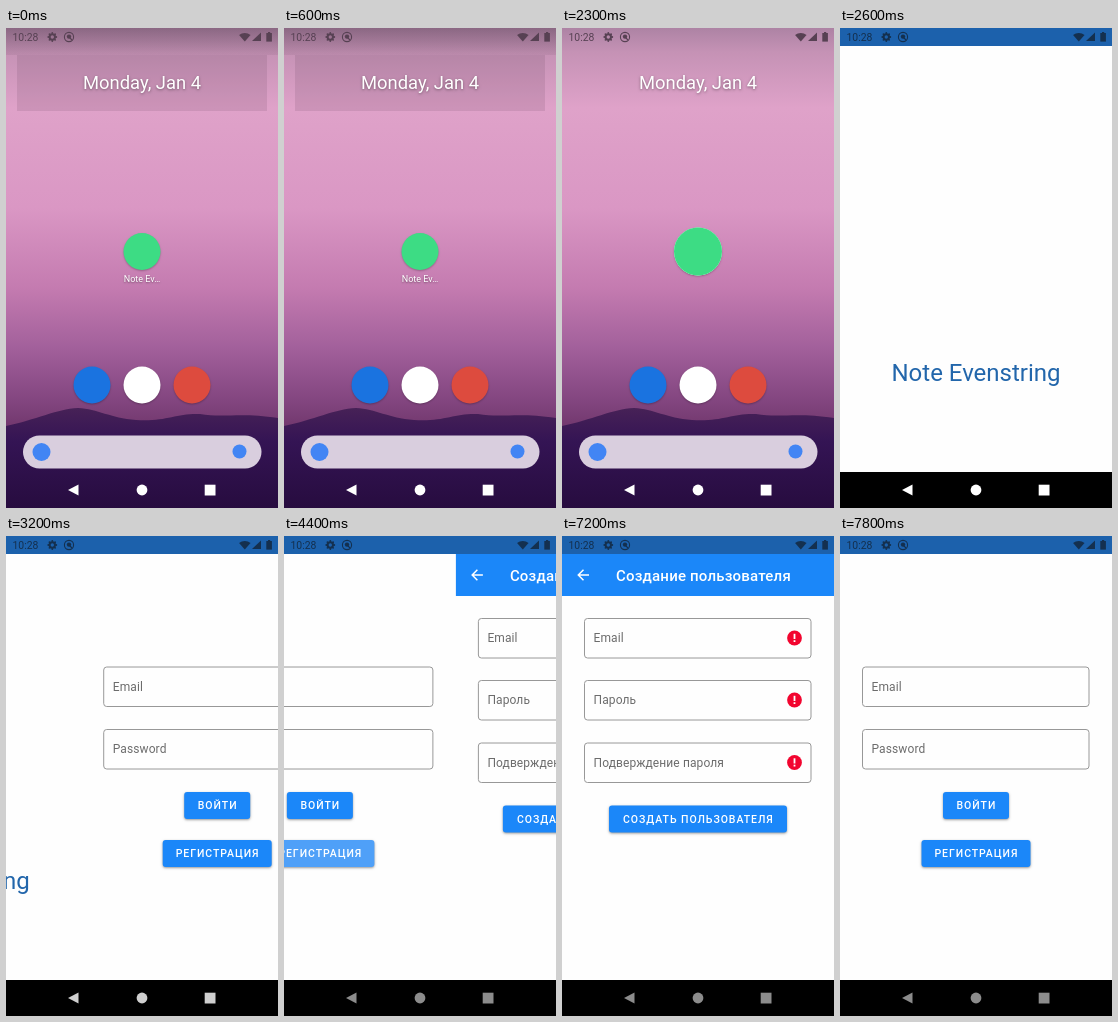
Write an HTML page with a canvas that moves like this. It is 272 by 480 pixels and loops after 8 s.

```html
<!DOCTYPE html>
<html lang="ru">
<head>
<meta charset="utf-8">
<style>
html, body { margin: 0; width: 100%; height: 100%; overflow: hidden; background: #fff; }
canvas { display: block; width: 272px; height: 480px; }
</style>
</head>
<body>
<canvas></canvas>
<script>
const W = 272, H = 480, LOOP = 8000;
const BLUE = '#1b87f9', PRESSED = [79, 160, 248], IDLE = [27, 135, 249];
const canvas = document.querySelector('canvas');
const ratio = window.devicePixelRatio || 1;
canvas.width = W * ratio;
canvas.height = H * ratio;
const c = canvas.getContext('2d');
c.scale(ratio, ratio);

const clamp = x => Math.min(1, Math.max(0, x));
const span = (t, from, to) => clamp((t - from) / (to - from));
const ease = x => (1 - Math.cos(Math.PI * x)) / 2;
const mix = (a, b, p) => a + (b - a) * p;

function rect(x, y, w, h, color) {
  c.fillStyle = color;
  c.fillRect(x, y, w, h);
}
function circle(x, y, r, color) {
  c.fillStyle = color;
  c.beginPath();
  c.arc(x, y, r, 0, 7);
  c.fill();
}
function round(x, y, w, h, r) {
  c.beginPath();
  c.roundRect(x, y, w, h, r);
}
function shape(points, color) {
  c.fillStyle = color;
  c.beginPath();
  points.forEach(p => c.lineTo(...p));
  c.fill();
}
function text(str, x, y, size, color, { weight = 400, align = 'left', spacing = 0 } = {}) {
  c.font = `${weight} ${size}px Roboto, sans-serif`;
  c.letterSpacing = spacing + 'px';
  c.textAlign = align;
  c.fillStyle = color;
  c.fillText(str, x, y);
}
function gradient(y0, y1, ...stops) {
  const g = c.createLinearGradient(0, y0, 0, y1);
  stops.forEach(([at, color]) => g.addColorStop(at, color));
  return g;
}
function shadowed(blur, dy, alpha, draw) {
  c.save();
  c.shadowColor = `rgba(0,0,0,${alpha})`;
  c.shadowBlur = blur * ratio;
  c.shadowOffsetY = dy * ratio;
  draw();
  c.restore();
}

function statusIcons(color) {
  text('10:28', 6.5, 13, 10.4, color);
  c.strokeStyle = color;
  c.lineWidth = 2;
  c.beginPath();
  c.arc(46.3, 9, 2.7, 0, 7);
  c.stroke();
  for (let i = 0; i < 8; i++) {
    const a = i * Math.PI / 4;
    circle(46.3 + 4 * Math.cos(a), 9 + 4 * Math.sin(a), 0.9, color);
  }
  c.lineWidth = 1.1;
  c.beginPath();
  c.arc(63, 9, 4.6, 0, 7);
  c.stroke();
  circle(63, 8.6, 2.2, color);
  c.beginPath();
  c.moveTo(63, 9);
  c.lineTo(66, 12);
  c.stroke();
  c.fillStyle = color;
  c.beginPath();
  c.moveTo(238.8, 13.5);
  c.arc(238.8, 13.5, 8.6, -2.3, -0.84);
  c.fill();
  shape([[246, 13], [255, 13], [255, 4.5]], color);
  rect(260.3, 5, 5.6, 8.6, color);
  rect(262, 4, 2.2, 1.2, color);
}

function navIcons(color) {
  shape([[62, 462], [72.5, 456.5], [72.5, 467.5]], color);
  circle(136, 462, 5.4, color);
  rect(198.7, 456.7, 10.8, 10.8, color);
}

function home(t) {
  rect(0, 0, W, H, gradient(0, 400,
    [0, '#ad83a4'], [0.06, '#c592b5'], [0.2, '#dfa2c9'], [0.45, '#da97c4'],
    [0.65, '#c47bb0'], [0.8, '#a2609b'], [0.93, '#834680'], [1, '#71376d']));
  c.fillStyle = gradient(378, H, [0, '#482257'], [0.35, '#341454'], [1, '#270c3f']);
  c.beginPath();
  c.moveTo(0, H);
  c.lineTo(0, 398);
  c.bezierCurveTo(30, 392, 50, 381, 72, 380);
  c.bezierCurveTo(92, 381, 104, 390, 130, 392);
  c.bezierCurveTo(160, 394, 170, 385, 194, 386);
  c.bezierCurveTo(218, 390, 235, 384, 272, 390);
  c.lineTo(W, H);
  c.fill();
  if (t < 1900) {
    rect(0, 0, W, 27, gradient(0, 27, [0, 'rgba(60,40,55,.3)'], [1, 'rgba(60,40,55,.08)']));
    rect(11, 27, 250, 56, 'rgba(80,50,75,.13)');
  }
  statusIcons('#574153');
  shadowed(3, 1, 0.4, () => text('Monday, Jan 4', 136, 60.5, 18.4, '#fff', { align: 'center' }));

  shadowed(2, 1, 0.25, () => {
    circle(136, 223.5, mix(18.5, 24, span(t, 2200, 2300)), '#3ddc84');
    circle(86, 357, 18.5, '#1a73e0');
    circle(136, 357, 18.5, '#fff');
    circle(186, 357, 18.5, '#dd4b3e');
  });
  if (t < 2200)
    shadowed(2, 1, 0.4, () => text('Note Ev…', 136, 253.5, 9, '#fff', { align: 'center' }));

  round(17, 407.5, 238.5, 33, 16.5);
  c.fillStyle = '#d9cede';
  c.fill();
  circle(35.5, 424, 9, '#4285f4');
  circle(233.5, 423.5, 7, '#4285f4');
  navIcons('#fff');
}

function field(label, y, error) {
  round(22.5, y + 0.5, 226.5, 39.5, 3);
  c.strokeStyle = '#989898';
  c.lineWidth = 1;
  c.stroke();
  text(label, 31.5, y + 24.3, 12, '#6c6c6c', { spacing: 0.1 });
  if (error) {
    circle(232.5, y + 20, 7.4, '#f2052f');
    rect(231.6, y + 15.8, 1.8, 5.2, '#fff');
    rect(231.6, y + 22.2, 1.8, 1.8, '#fff');
  }
}

function button(label, x, y, w, press = 0) {
  shadowed(2.5, 1, 0.4, () => {
    round(x, y, w, 27, 3);
    c.fillStyle = `rgb(${IDLE.map((v, i) => mix(v, PRESSED[i], press))})`;
    c.fill();
  });
  text(label, x + w / 2 + 0.4, y + 17.3, 10.5, '#fff', { weight: 500, align: 'center', spacing: 0.94 });
}

function splash() {
  text('Note Evenstring', 136, 353, 24, '#2266ab', { align: 'center' });
}

function login(t) {
  field('Email', 130.5);
  field('Password', 193);
  button('ВОЙТИ', 103, 256, 66);
  button('РЕГИСТРАЦИЯ', 81.5, 304, 109, t < 5000 ? span(t, 4150, 4300) : 0);
}

function signup(t) {
  rect(0, 18, W, 42, BLUE);
  c.strokeStyle = '#fff';
  c.lineWidth = 1.5;
  c.beginPath();
  c.moveTo(27, 39);
  c.lineTo(16.5, 39);
  c.moveTo(21.5, 33.8);
  c.lineTo(16.3, 39);
  c.lineTo(21.5, 44.2);
  c.stroke();
  text('Создание пользователя', 54, 44.6, 15, '#fff', { weight: 500, spacing: 0.18 });
  const errors = t >= 5500;
  field('Email', 82, errors);
  field('Пароль', 144, errors);
  field('Подверждение пароля', 206.5, errors);
  button('СОЗДАТЬ ПОЛЬЗОВАТЕЛЯ', 47, 269.5, 178, span(t, 5450, 5600) * (1 - span(t, 6000, 6300)));
}

function page(draw, x, t) {
  if (Math.abs(x) >= W) return;
  c.save();
  c.translate(x, 0);
  draw(t);
  c.restore();
}

function app(t) {
  rect(0, 0, W, H, '#fefefe');
  const enter = ease(span(t, 2942, 3342));
  const forward = ease(span(t, 4235, 4635)) - ease(span(t, 7300, 7700));
  page(splash, -W * enter, t);
  page(login, W * (1 - enter - forward), t);
  page(signup, W * (1 - forward), t);
  rect(0, 0, W, 18, '#1c61ac');
  statusIcons('#14304f');
  rect(0, 444, W, 36, '#000');
  const grey = Math.round(mix(255, 140, span(t, 2700, 3900)));
  navIcons(`rgb(${grey},${grey},${grey})`);
}

// The window grows out of the launcher icon.
function launch(t) {
  const p = ease(span(t, 2300, 2600));
  c.save();
  round(mix(112, 0, p), mix(199.5, 0, p), mix(48, W, p), mix(48, H, p), mix(24, 0, p));
  c.clip();
  app(t);
  c.globalAlpha = 1 - span(p, 0, 0.5);
  rect(0, 0, W, H, '#3ddc84');
  c.restore();
}

function frame(now) {
  const t = now % LOOP;
  if (t < 2600) home(t);
  if (t >= 2600) app(t);
  else if (t > 2300) launch(t);
  requestAnimationFrame(frame);
}
requestAnimationFrame(frame);
</script>
</body>
</html>
```
